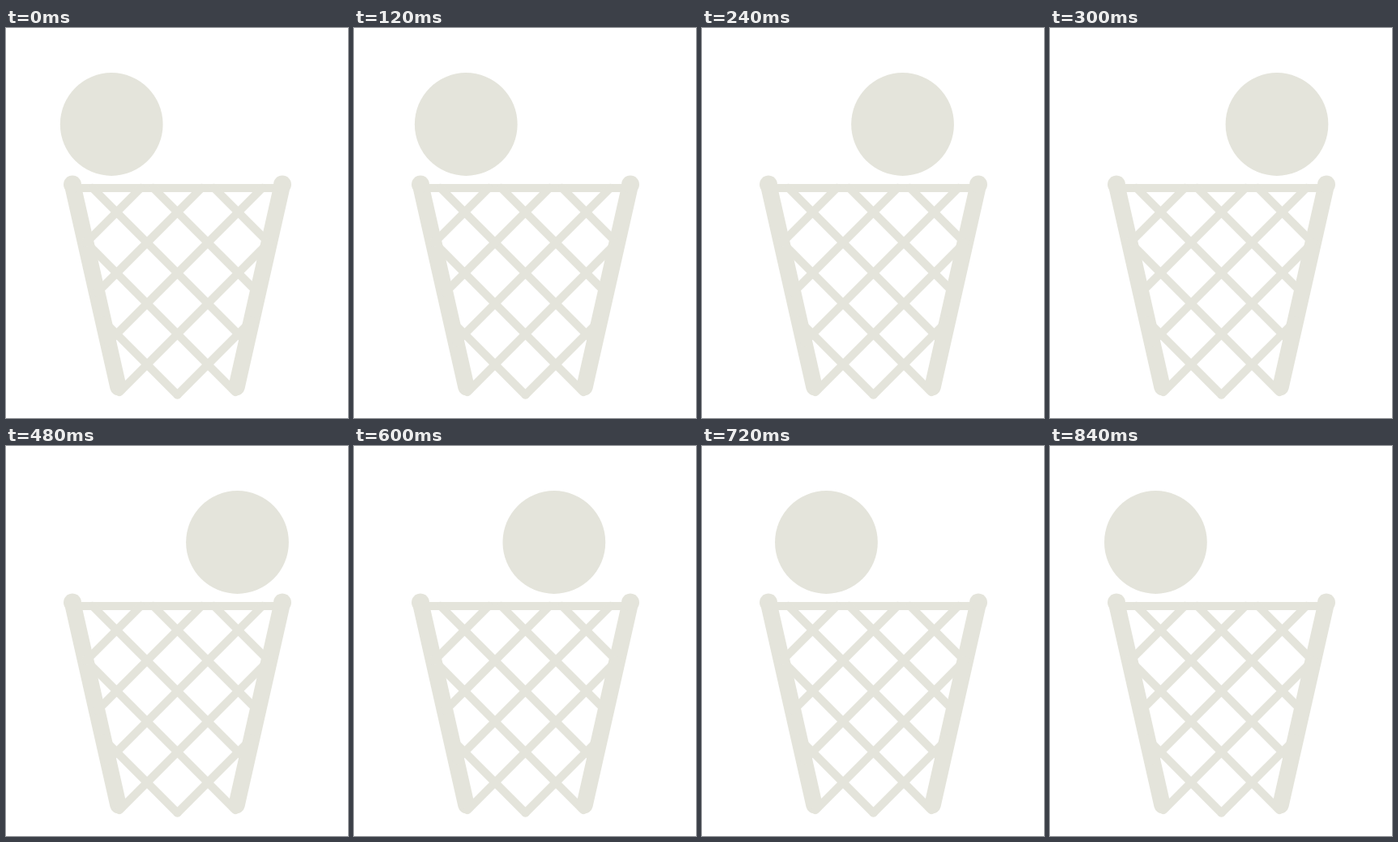
Recreate the animation shown at these times as an HTML page. Size 422 by 480 pixels, loop 0.9 s.

```html
<!DOCTYPE html>
<html lang="en">
<head>
<meta charset="utf-8">
<title>Ball over basket</title>
<style>
  html, body { margin: 0; width: 100%; height: 100%; overflow: hidden; background: #fff; }
  svg { display: block; width: 100%; height: 100%; }
</style>
</head>
<body>
<svg viewBox="0 0 422 480" fill="#e4e4db" stroke="#e4e4db" stroke-linecap="round">
  <defs>
    <g id="half">
      <path stroke-width="20.5" d="M82 192.500L138.500 442"/>
      <circle cx="82" cy="192.500" r="11" stroke="none"/>
      <path id="net" stroke-width="10"/>
    </g>
  </defs>
  <circle id="ball" cy="118.5" r="63.4" stroke="none"/>
  <path stroke-width="10" d="M82 197H341"/>
  <use href="#half"/>
  <use href="#half" transform="translate(423) scale(-1 1)"/>
</svg>
<script>
const LOOP = 900, LEFT = 130.2, RIGHT = 287;
const ball = document.getElementById("ball");

// Parallel diagonals x = y + offset, each running from rim or left post to the right post.
const RIM = 196.7, TIP = 451.6, GAP = 75;
const slope = 56.5 / 249.5, postX = 82 - 192.5 * slope;
let net = "";
for (let i = 0; i < 5; i++) {
  const offset = 211.5 - TIP + GAP * i;
  const top = Math.max(RIM, (postX - offset) / (1 - slope));
  const bottom = Math.min(TIP, (423 - postX - offset) / (1 + slope));
  net += `M${top + offset} ${top}L${bottom + offset} ${bottom}`;
}
document.getElementById("net").setAttribute("d", net);

function easeInOut(time, start, end, power) {
  const u = Math.min(1, Math.max(0, (time - start) / (end - start)));
  return u < 0.5 ? (2 * u) ** power / 2 : 1 - (2 - 2 * u) ** power / 2;
}

function draw() {
  const t = performance.now() % LOOP;
  const across = easeInOut(t, 6, 412, 4) - easeInOut(t, 421, 871, 3);
  ball.setAttribute("cx", LEFT + (RIGHT - LEFT) * across);
  requestAnimationFrame(draw);
}
draw();
</script>
</body>
</html>
```
